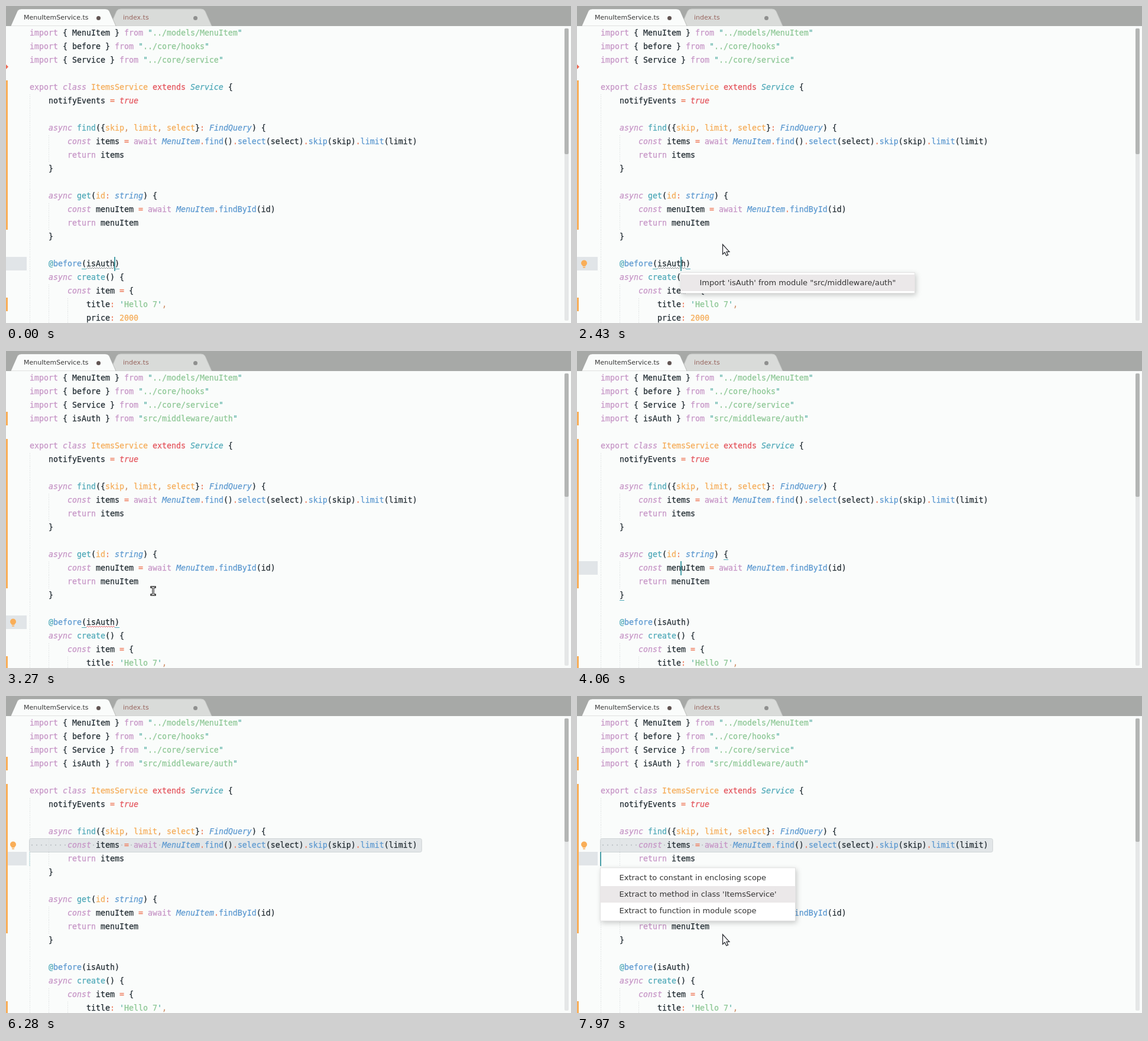
An HTML page for the animation above (8000 ms loop, 956x537 px).

```html
<!DOCTYPE html>
<html lang="en">
<head>
<meta charset="utf-8">
<style>
html, body { margin: 0; height: 100%; overflow: hidden; background: #fafcfb; }
svg { display: block; width: 956px; height: 537px; }
text { white-space: pre; }
.code { font: 13.29px "DejaVu Sans Mono", "Noto Sans Mono", monospace; stroke-width: .25px; }
.tab { font: 11px "DejaVu Sans", sans-serif; }
.menu { font: 13px "DejaVu Sans", sans-serif; fill: #333; }
.box { filter: drop-shadow(2px 3px 4px #0003); }
</style>
</head>
<body>
<svg id="stage" viewBox="0 0 956 537"></svg>
<script>
const LOOP = 8000, ROW = 23, COL = 8, LEFT = 40, TOP = 34;
const BACK = 50, INSERT = 2510, CLIMB = 3550, STEP = 170, STEPS = 9, SELECT = 5280;
const colors = {
  k: '#222c33', p: '#c695c6', b: '#5c99d0', t: '#4fa9b8', o: '#f5ac58',
  g: '#8dc795', q: '#5fb3a8', r: '#e4555d', e: '#ee7d5e', c: '#cf9068'
};

// "~x" starts a run in colour x; a capital letter makes it italic.
const imp = (name, path) => `~pimport ~k{ ${name} } ~pfrom ~q"~g${path}~q"`;
const before = [
  imp('MenuItem', '../models/MenuItem'),
  imp('before', '../core/hooks'),
  imp('Service', '../core/service'),
  '',
  '~pexport ~Pclass ~oItemsService ~rextends ~TService ~k{',
  '~k    notifyEvents ~e= ~Rtrue',
  '',
  '~P    async ~tfind~k({~oskip~c, ~olimit~c, ~oselect~k}~e: ~BFindQuery~k) {',
  '~P        const ~kitems ~e= ~pawait ~BMenuItem~e.~bfind~k()~e.~bselect~k(select)~e.~bskip~k(skip)~e.~blimit~k(limit)',
  '~p        return ~kitems',
  '~k    }',
  '',
  '~P    async ~tget~k(~oid~e: ~Bstring~k) {',
  '~P        const ~kmenuItem ~e= ~pawait ~BMenuItem~e.~bfindById~k(id)',
  '~p        return ~kmenuItem',
  '~k    }',
  '',
  '~t    @~bbefore~k(isAuth)',
  '~P    async ~tcreate~k() {',
  '~P        const ~kitem ~e= ~k{',
  "~k            title~e: ~q'~gHello 7~q'~c,",
  '~k            price~e: ~o2000'
];
const after = before.toSpliced(3, 0, imp('isAuth', 'src/middleware/auth'));

const x = col => LEFT + col * COL;
const y = row => TOP + row * ROW;
const clamp = (v, lo, hi) => Math.min(hi, Math.max(lo, v));
const during = (t, a, b) => t >= a && t < b;
const rect = (x, y, w, h, fill, more = '') =>
  `<rect x="${x}" y="${y}" width="${w}" height="${h}" fill="${fill}" ${more}/>`;
const path = (d, fill, more = '') => `<path d="${d}" fill="${fill}" ${more}/>`;
const dot = (x, y, r, fill) => `<circle cx="${x}" cy="${y}" r="${r}" fill="${fill}"/>`;
const text = (x, y, cls, s, more = '') => `<text x="${x}" y="${y}" class="${cls}" ${more}>${s}</text>`;

function codeLine(src, row) {
  const runs = src.split('~').slice(1).map(run => {
    const key = run[0], low = key.toLowerCase(), color = colors[low];
    const style = key === low ? '' : 'font-style="italic"';
    return `<tspan fill="${color}" stroke="${color}" ${style}>${run.slice(1)}</tspan>`;
  });
  return text(LEFT, y(row) + 16, 'code', runs.join(''));
}

// Dotted guides follow the indentation; blank lines keep that of the line above.
function guides(plain) {
  let indent = 0, out = '';
  plain.forEach((line, row) => {
    if (line) indent = line.search(/\S/);
    for (let col = 0; col < indent; col += 4)
      out += path(`M${x(col) + .5} ${y(row) + 1}v${ROW}`, 'none', 'stroke="#d3d8d8" stroke-dasharray="1 2"');
  });
  return out;
}

function bracketPairs(doc) {
  const open = [], pairs = [];
  [...doc].forEach((ch, i) => {
    if ('({'.includes(ch)) open.push(i);
    if (')}'.includes(ch)) pairs.push([open.pop(), i]);
  });
  return [...pairs, ...open.map(i => [i, Infinity])].sort((a, b) => b[0] - a[0]);
}

function makePage(lines, marks) {
  const plain = lines.map(s => s.replace(/~./g, '')), doc = plain.join('\n');
  return { plain, doc, pairs: bracketPairs(doc), svg: guides(plain) + lines.map(codeLine).join('') + marks };
}

const bar = (row, rows) => rect(0, y(row), 3, rows * ROW, '#f9ae58');
const scroll = h => rect(945, 38, 7, 495, '#e5e7e7', 'rx="2"') + rect(945, 38, 7, h, '#b3b5b4', 'rx="2"');
const pages = [
  makePage(before, path('M0 99L4 103L0 107Z', '#ee6a55') + bar(4, 11) + bar(20, 1) + scroll(213)),
  makePage(after, bar(3, 1) + bar(5, 11) + bar(21, 1) + scroll(209))
];

const tabShape = (l, r) =>
  `M${l} 34L${l + 11} 9Q${l + 13} 5 ${l + 18} 5H${r - 18}Q${r - 13} 5 ${r - 11} 9L${r} 34Z`;
const tabs = rect(0, 0, 956, 34, '#a7a9a7') +
  path(tabShape(176, 348), '#d9dbd9', 'stroke="#c6c8c6"') +
  path(tabShape(8, 186), '#fafcfb', 'stroke="#8f918f" stroke-opacity=".5"') +
  rect(0, 34, 956, 1.5, '#fafcfb') +
  text(30, 23, 'tab', 'MenuItemService.ts', 'fill="#383838"') + dot(156.5, 20.5, 3.5, '#625654') +
  text(198, 23, 'tab', 'index.ts', 'fill="#98665f"') + dot(320.5, 20.5, 3.5, '#8f908f');

const bulb = row => dot(12, y(row) + 10.5, 5, '#f9ae58') +
  rect(9.5, y(row) + 13, 5, 3, '#f9ae58') + rect(10, y(row) + 17, 4, 1.5, '#f9ae58');

const squiggle = (row, color) =>
  path(`M${x(12)} ${y(row) + 20}` + 'l2 -2l2 2'.repeat(12), 'none', `stroke="${color}" stroke-width=".9"`);

function selection(row, line) {
  const spaces = [...line].map((ch, c) => ch === ' ' ? dot(x(c) + 4, y(row) + 11.5, 1, '#b4babf') : '');
  return rect(39.5, y(row) + .5, (line.length + 1) * COL, ROW, '#e2e6e8', 'rx="3" stroke="#d0d5d7"') + spaces.join('');
}

function menu(left, top, w, pad, items, active) {
  return `<g class="box">${rect(left, top, w, items.length * 28 + pad * 2, '#fff', 'stroke="#dcdcdc" stroke-width=".8"')}</g>` +
    items.map((s, i) => {
      const iy = top + pad + i * 28;
      return (i === active ? rect(left, iy, w, 28, '#ebe8e9') : '') + text(left + 32, iy + 18, 'menu', s);
    }).join('');
}

const arrow = path('M246.5 404V420.5L250 417.3L252.8 423L255.6 421.7L253 416.3H257.8Z', '#fff', 'stroke="#2b2e33" stroke-width="1.3"');
const beamPath = 'M246 400H248L249 401L250 400H252M249 401V412M246 413H248L249 412L250 413H252';
const beam = path(beamPath, 'none', 'stroke="#222" stroke-width="3.4" stroke-linecap="square"') +
  path(beamPath, 'none', 'stroke="#fff" stroke-width="1.2"');

// The caret climbs in even steps, keeping its column where the line is long enough.
function caretAt(t, plain) {
  if (t >= SELECT) return { row: 10, col: 0, moved: SELECT };
  const step = clamp(Math.floor((t - CLIMB) / STEP) + 1, 0, STEPS);
  const row = (t < INSERT ? 17 : 18) - step;
  const moved = step ? CLIMB + (step - 1) * STEP : t < INSERT ? BACK : INSERT;
  return { row, col: Math.min(t < BACK ? 18 : 17, plain[row].length), moved };
}

// Solid after a move, then a soft blink: fade out, pause, fade in, hold.
function caretAlpha(age) {
  const rest = 450, fade = 320, pause = 170, cycle = 1130;
  if (age < rest) return 1;
  const p = (age - rest) % cycle;
  return clamp(1 - p / fade, 0, 1) + clamp((p - fade - pause) / fade, 0, 1);
}

function underlines({ doc, plain, pairs }, row, col) {
  const pos = plain.slice(0, row).join('\n').length + 1 + col;
  const pair = pairs.find(([a, b]) => a < pos && pos <= b + 1) || [];
  return pair.filter(isFinite).map(i => {
    const above = doc.slice(0, i).split('\n');
    return rect(x(above.at(-1).length), y(above.length - 1) + 20, COL, 1, '#4fa9b8');
  }).join('');
}

function draw(t) {
  const page = pages[t < INSERT ? 0 : 1];
  const { row, col, moved } = caretAt(t, page.plain);
  let out = rect(0, 0, 956, 537, '#fafcfb') + rect(0, y(row), 35, ROW, '#e1e5e8');
  if (t >= SELECT) out += selection(9, page.plain[9]);
  out += page.svg;
  if (t < SELECT) out += underlines(page, row, col);
  if (t < CLIMB) out += squiggle(row, t < INSERT ? '#7d8286' : '#e4555d');
  if (during(t, 600, CLIMB)) out += bulb(row);
  if (t >= 5770) out += bulb(9);
  out += rect(x(col) - 1, y(row), 2, ROW + 1, '#4a9fa8', `opacity="${caretAlpha(t - moved).toFixed(2)}"`);
  out += tabs;
  if (during(t, 1350, INSERT))
    out += menu(175.5, 451.5, 396, 3.5, ['Import \'isAuth\' from module "src/middleware/auth"'], t < 1800 ? -1 : 0);
  if (t >= 6520)
    out += menu(39.5, 291, 330, 3, [
      'Extract to constant in enclosing scope',
      "Extract to method in class 'ItemsService'",
      'Extract to function in module scope'
    ], t < 7200 ? -1 : t < 7920 ? 0 : 1);
  if (during(t, 1250, INSERT) || t >= 6470) out += arrow;
  if (during(t, INSERT, CLIMB)) out += beam;
  return out;
}

const stage = document.getElementById('stage');
const start = performance.now();
let shown = '';
function tick() {
  const next = draw((performance.now() - start) % LOOP);
  if (next !== shown) stage.innerHTML = shown = next;
  requestAnimationFrame(tick);
}
tick();
</script>
</body>
</html>
```
